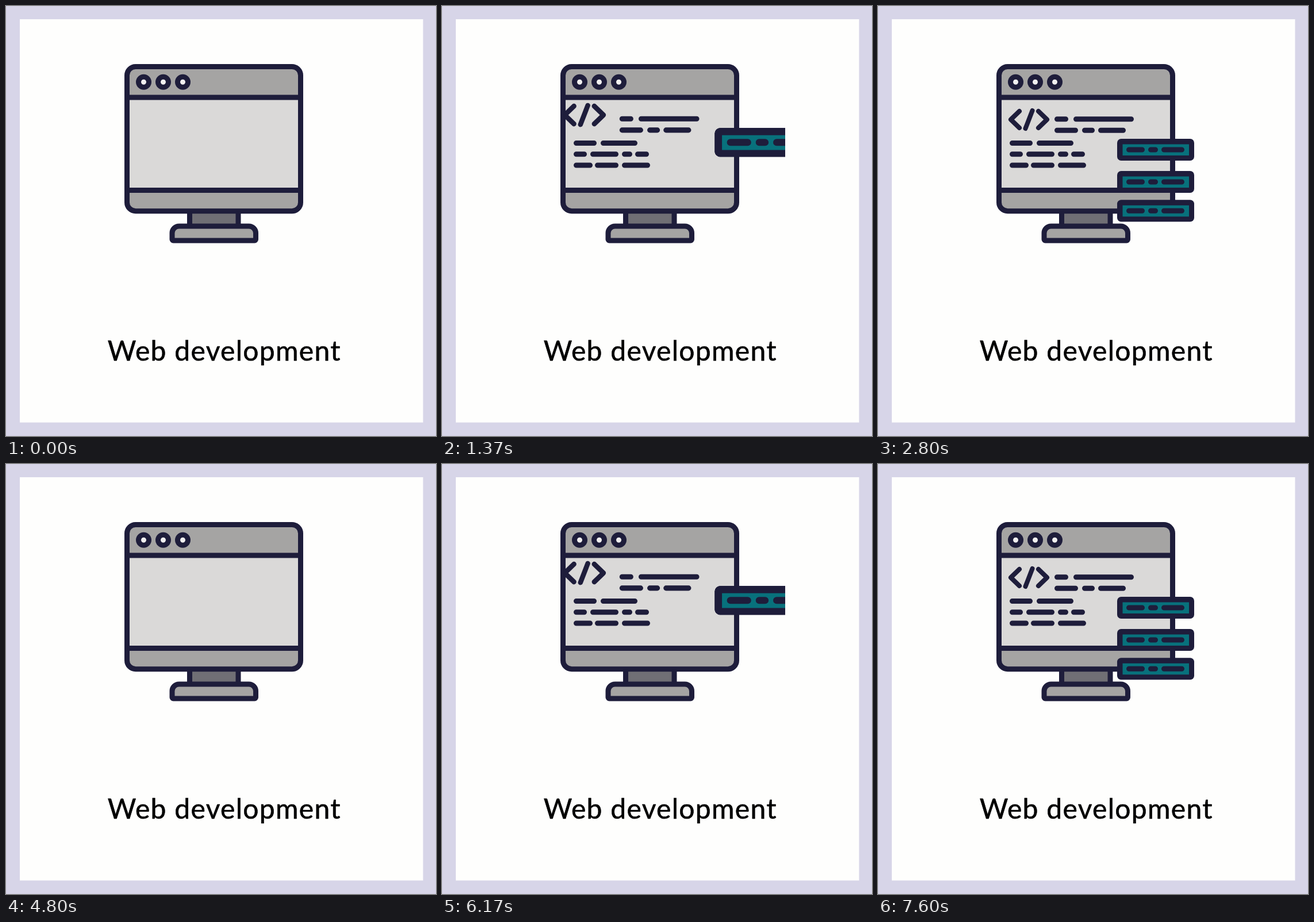
An HTML page for the animation above (9.56 s loop, 748x748 px).

```html
<!DOCTYPE html>
<html lang="en">
<head>
<meta charset="utf-8">
<title>Web development</title>
<style>
  html, body { margin: 0; width: 100%; height: 100%; overflow: hidden; background: #d7d5e8; }
  svg { display: block; width: 100%; height: 100%; }
  text { font: 400 48px Lato, "Open Sans", sans-serif; letter-spacing: 1.3px; }
</style>
</head>
<body>
<svg viewBox="0 0 748 748">
  <defs>
    <clipPath id="area"><rect x="129" y="96" width="468" height="285"/></clipPath>
  </defs>
  <rect width="748" height="748" fill="#d7d5e8"/>
  <rect x="24" y="23" width="701.5" height="701.5" fill="#fefefd"/>

  <g stroke="#1e1d3b" stroke-width="9">
    <rect x="319.5" y="350" width="84.5" height="36" fill="#706f75"/>
    <path d="M291 408a2 2 0 0 1 -2 -2V395a12 12 0 0 1 12 -12H422.500a12 12 0 0 1 12 12V406a2 2 0 0 1 -2 2Z" fill="#a5a4a3"/>
    <rect x="210.500" y="105.500" width="302" height="251.200" rx="15" fill="#a5a4a3"/>
    <rect x="210.500" y="159" width="302" height="161.500" fill="#dad9d8"/>
    <g id="buttons" fill="#f1f0f0"></g>
  </g>

  <g clip-path="url(#area)">
    <g id="moving" fill="none" stroke="#1e1d3b" stroke-width="9" stroke-linecap="round" stroke-linejoin="round"></g>
  </g>

  <text x="379.700" y="616.500" text-anchor="middle" stroke="#000" stroke-width=".6" stroke-linejoin="round">Web development</text>
</svg>
<script>
const LOOP = 9560, CYCLE = 4800;
const NS = "http://www.w3.org/2000/svg";
const moving = document.getElementById("moving");

function add(parent, tag, attrs = {}) {
  const el = document.createElementNS(NS, tag);
  for (const key in attrs) el.setAttribute(key, attrs[key]);
  return parent.appendChild(el);
}

// Row of round-capped dashes; spans are outer left and right edges.
function dashes(parent, y, spans) {
  const d = spans.map(([a, b]) => `M${a + 4.5} ${y}H${b - 4.5}`).join("");
  add(parent, "path", { d });
}

function panel(parent) {
  const g = add(parent, "g");
  add(g, "rect", { x: 416, y: 231, width: 134, height: 38, rx: 7, fill: "#1e1d3b", stroke: "none" });
  add(g, "rect", { x: 425.5, y: 240.5, width: 115.5, height: 19.5, fill: "#08717c", stroke: "none" });
  dashes(g, 250, [[432, 464], [470, 487], [493, 533]]);
  return g;
}

for (const cx of [239.5, 273.5, 307.5])
  add(document.getElementById("buttons"), "circle", { cx, cy: 132.3, r: 9 });

const lines = add(moving, "g");
dashes(lines, 238.5, [[229, 269], [276, 340]]);
dashes(lines, 257.8, [[229, 252], [258, 307], [313, 331], [336, 360]]);
dashes(lines, 277, [[229, 262], [266, 307], [313, 362]]);

const header = add(moving, "g");
dashes(header, 196.8, [[307, 331], [340, 445]]);
dashes(header, 216.3, [[307, 348], [355, 377], [383, 431]]);

const tag = add(moving, "g", { "stroke-width": 8 });
add(tag, "path", { d: "M246 183L231 197.500L246 212M268.500 182L256.500 213M279 183L294 197.500L279 212" });

const panels = add(moving, "g");
const third = panel(panels), second = panel(panels);
panel(panels);

// Each part flies in from (dx, dy) at double size.
const flights = [
  { el: lines, cx: 295.5, cy: 257.8, dx: -314, dy: -41, start: 57, span: 1290 },
  { el: header, cx: 376, cy: 206.5, dx: 360, dy: -83, start: 450, span: 1125 },
  { el: tag, cx: 262.5, cy: 197.5, dx: -221, dy: -114, start: 708, span: 1125 },
  { el: panels, cx: 483, cy: 250, dx: 251, dy: -40, start: 1014, span: 1125 }
];
const drops = [
  { el: second, dist: 56, start: 1713, span: 1080 },
  { el: third, dist: 106.3, start: 1860, span: 980 }
];

// Share of the way still to go, cubic ease-out.
function left(t, { start, span }) {
  const p = Math.min(1, Math.max(0, (t - start) / span));
  return (1 - p) ** 3;
}

function draw(time) {
  const t = (time % LOOP) % CYCLE;
  for (const f of flights) {
    const r = left(t, f);
    f.el.setAttribute("transform",
      `translate(${f.cx + f.dx * r} ${f.cy + f.dy * r}) scale(${1 + r}) translate(${-f.cx} ${-f.cy})`);
    f.el.setAttribute("visibility", t > f.start ? "visible" : "hidden");
  }
  for (const d of drops)
    d.el.setAttribute("transform", `translate(0 ${d.dist * (1 - left(t, d))})`);
}

const begin = performance.now();
function tick() {
  draw(performance.now() - begin);
  requestAnimationFrame(tick);
}
tick();
</script>
</body>
</html>
```
